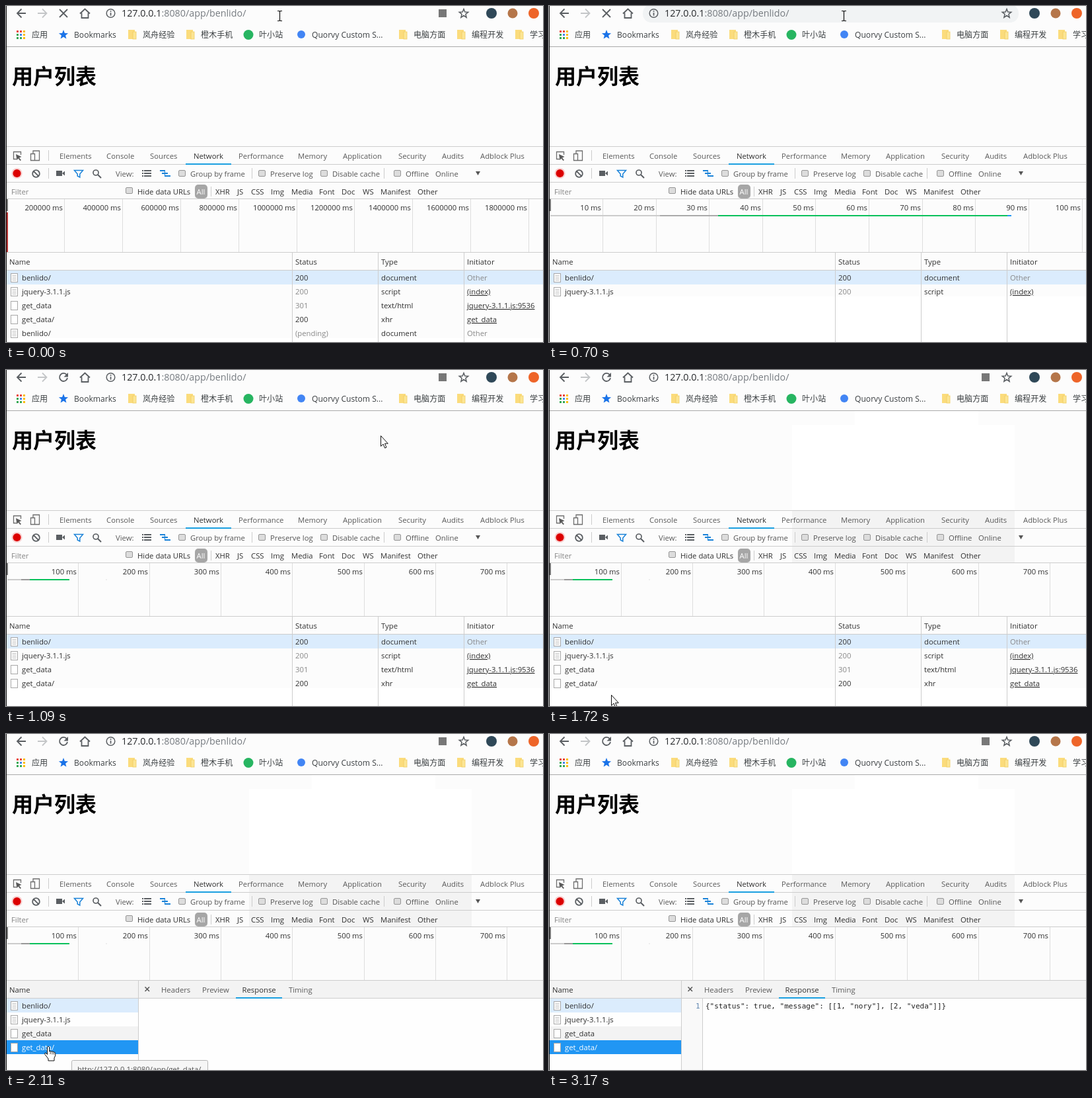
These frames come from a looping animation (813 by 508 pixels, 4230 ms). An HTML page:

```html
<!DOCTYPE html>
<html lang="zh">
<head>
<meta charset="utf-8">
<style>
html, body { margin: 0; width: 100%; height: 100%; overflow: hidden; background: #fcfcfc; }
svg { display: block; width: 813px; height: 508px; }
text { font: 11.3px "Open Sans", "Noto Sans CJK SC", sans-serif; white-space: pre; }
.mark { font-size: 12.1px; }
.url { font-size: 14.3px; }
.title { font: bold 32px "Noto Sans CJK SC", sans-serif; }
.code { font: 11px "DejaVu Sans Mono", monospace; }
.end { text-anchor: end; }
.link { text-decoration: underline; }
</style>
</head>
<body>
<svg id="stage" viewBox="0 0 813 508">
  <g id="under"></g><g id="chrome"></g><g id="live"></g>
</svg>
<script>
const LOOP = 4230, USER = 'benlido';
const INK = '#303030', DIM = '#888', ICON = '#5a5e62', RULE = '#cdcdcd', BLUE = '#1a9fe0';
const $ = id => document.getElementById(id);

const text = (x, y, s, fill = INK, cls = '') => `<text x="${x}" y="${y}" fill="${fill}" class="${cls}">${s}</text>`;
const rect = (x, y, w, h, fill, more = '') => `<rect x="${x}" y="${y}" width="${w}" height="${h}" fill="${fill}" ${more}/>`;
const disc = (x, y, r, fill, more = '') => `<circle cx="${x}" cy="${y}" r="${r}" fill="${fill}" ${more}/>`;
const line = (d, stroke = ICON, w = 1.8) => `<path d="${d}" fill="none" stroke="${stroke}" stroke-width="${w}"/>`;
const shape = (d, fill, more = '') => `<path d="${d}" fill="${fill}" ${more}/>`;
const hRule = (y, x = 1, w = 812, c = RULE) => rect(x, y, w, 1, c);
const vRule = (x, y, h, c = RULE) => rect(x, y, 1, h, c);
const labels = (y, fill, list) => list.map(([x, s]) => text(x, y, s, fill)).join('');

function star(cx, cy, r) {
  let d = '';
  for (let i = 0; i < 10; i++) {
    const a = Math.PI * (i / 5 - 0.5), q = i % 2 ? r * 0.43 : r;
    d += (i ? 'L' : 'M') + (cx + q * Math.cos(a)).toFixed(1) + ' ' + (cy + q * Math.sin(a)).toFixed(1);
  }
  return d + 'Z';
}

const folder = x => rect(x, 36, 10, 14, '#fbdc7c') + rect(x + 7, 39, 5, 11, '#fce593', 'stroke="#f0cc62" stroke-width=".8"');
const checkbox = (x, y) => rect(x + .5, y + .5, 10, 9, '#dcdcdc', 'rx="1.5" stroke="#969696"');

function browserBar() {
  const dots = ['#ea4335', '#ea4335', '#fbbc05', '#34a853', '#4285f4', '#fbbc05', '#34a853', '#34a853', '#fbbc05'];
  return line('M30 11H17.5M23.5 4.5L17 11L23.5 17.5') +
    line('M48 11H61M55 4.5L61.5 11L55 17.5', '#c4c6c8') +
    line('M112 11.5L119.5 4.5L127 11.5M114.5 10.5V18H124.5V10.5') +
    disc(158.5, 11, 6.3, 'none', `stroke="${ICON}" stroke-width="1.5"`) +
    rect(157.7, 10, 1.7, 4.6, ICON) + rect(157.7, 7, 1.7, 1.8, ICON) +
    text(175, 16, `127.0.0.1<tspan fill="#767b80">:8080/app/${USER}/</tspan>`, '#27292c', 'url') +
    line(star(693, 11.5, 7), ICON, 1.5) +
    disc(735, 11, 8, '#2f4858') + disc(767, 11, 7.5, '#b5764a') + disc(799, 11, 8, '#ee6529') +
    dots.map((c, i) => rect(16 + i % 3 * 5, 37 + (i / 3 | 0) * 5, 3, 3, c)).join('') +
    shape(star(87, 43.5, 7.5), '#1a73e8') +
    [185, 273, 595, 683, 771].map(folder).join('') +
    disc(367, 43.5, 7.5, '#27b561') + disc(447, 43, 6, '#4285f4') +
    [[39, '应用'], [103, 'Bookmarks'], [207, '岚舟经验'], [295, '橙木手机'], [383, '叶小站'],
     [463, 'Quorvy Custom S...'], [617, '电脑方面'], [705, '编程开发'], [793, '学习']]
      .map(([x, s]) => text(x, 48, s, '#3c4043', 'mark')).join('') +
    hRule(61, 1, 812, '#aaa') +
    text(9, 118, '用户列表', '#000', 'title');
}

function toolbars() {
  const bars = [249, 253, 257].map(y => rect(206, y - 1, 2, 2, ICON) + rect(209, y - 1, 11, 2, ICON)).join('');
  return [212, 239, 266, 291].map(y => hRule(y)).join('') +
    line('M16 231.5H11.5V220.5H22.5V225', '#6e6e6e', 1.3) + shape('M15 224L23.5 228L20 229.5L23 233L21.5 234L18.5 230.5L16.5 233Z', '#5a5a5a') +
    line('M41 223V219H50.5V233.5H44M37.5 223.5H43.5V233.5H37.5Z', '#6e6e6e', 1.3) +
    vRule(64, 218, 16) +
    labels(231, '#5a5a5a', [[81, 'Elements'], [152, 'Console'], [218, 'Sources'], [352, 'Performance'], [442, 'Memory'],
      [510, 'Application'], [594, 'Security'], [660, 'Audits'], [718, 'Adblock Plus']]) +
    text(284, 231, 'Network') + rect(272, 238, 69, 2, BLUE) +
    disc(16.5, 253, 8, '#f8cfcf') + disc(16.5, 253, 6, '#dc0000') +
    disc(45.5, 253.5, 5.3, 'none', `stroke="${ICON}" stroke-width="1.8"`) + line('M42 250L49 257') +
    vRule(64, 245, 16) + rect(76, 249, 9, 8, ICON) + shape('M85 253L89 249.5V256.5Z', ICON) +
    line('M103.5 248.5H116.5L111.8 254V259L108.2 257V254Z', '#1a82d8', 1.5) +
    disc(136, 252, 4, 'none', `stroke="${ICON}" stroke-width="1.7"`) + line('M139 255L144 260', ICON, 2) +
    text(166, 258, 'View:', '#5a5a5a') + bars +
    rect(233, 248, 8, 2, '#1a82d8') + rect(236, 252, 9, 2, '#1a82d8') + rect(241, 256, 8, 2, '#1a82d8') + rect(240, 248, 1, 10, '#1a82d8') +
    [261, 382, 476, 587].map(x => checkbox(x, 248)).join('') + checkbox(181, 274) +
    vRule(372, 245, 16) + vRule(572, 245, 16) +
    labels(258, '#555', [[279, 'Group by frame'], [400, 'Preserve log'], [494, 'Disable cache'], [605, 'Offline'], [650, 'Online']]) +
    shape('M711 250H718L714.5 256Z', '#555') +
    text(8, 285, 'Filter', '#858585') + rect(286, 270, 19, 21, '#a6a6a6', 'rx="5"') + text(288.5, 285, 'All', '#fff') + vRule(310, 273, 15) +
    labels(285, INK, [[199, 'Hide data URLs'], [317, 'XHR'], [350, 'JS'], [371, 'CSS'], [401, 'Img'], [432, 'Media'],
      [474, 'Font'], [508, 'Doc'], [540, 'WS'], [567, 'Manifest'], [623, 'Other']]) +
    hRule(372) + rect(0, 0, 1, 508, '#111');
}

// step: pixels per tick, unit: ms per tick, bars: [x, width, colour]
function timeline(step, unit, bars) {
  let s = '';
  for (let i = 1; 1 + i * step < 813; i++) {
    const x = Math.floor(0.7 + i * step);
    s += vRule(x, 292, 80, '#dedede') + text(x - 2, 309, i * unit + ' ms', INK, 'end');
  }
  return s + bars.map(([x, w, c]) => rect(x, 316, w, 2, c)).join('') + rect(1, 292, 2, 18, '#777');
}

const ROWS = [
  [USER + '/', '200', 'document', 'Other'],
  ['jquery-3.1.1.js', '200', 'script', '(index)'],
  ['get_data', '301', 'text/html', 'jquery-3.1.1.js:9536'],
  ['get_data/', '200', 'xhr', 'get_data'],
  [USER + '/', '(pending)', 'document', 'Other']
];

function fileCell(i, fill) {
  const y = 400 + 21 * i;
  let s = rect(7.5, y + 4.5, 10, 13, '#fff', 'stroke="#a8a8a8"');
  if (i < 2 || i > 3) for (let k = 0; k < 4; k++) s += rect(9.5, y + 7 + k * 2.4, 6, 1, '#c4c4c4');
  return s + text(24, y + 15, ROWS[i][0], fill);
}

function table(n, pending, hover) {
  const bottom = Math.min(508, 397 + 21 * n);
  let s = rect(1, bottom, 812, 508 - bottom, '#fff') + hRule(399);
  for (let i = 0; i < n; i++) {
    const y = 415 + 21 * i, [, status, type, from] = ROWS[i], link = from !== 'Other';
    const wait = pending && !i, dim = wait || ![0, 3].includes(i);
    if (!i) s += rect(1, 400, 812, 21, '#dbecfd');
    else if (i === hover) s += rect(1, 400 + 21 * i, 812, 21, '#f3f3f3');
    s += fileCell(i, INK) + text(438, y, wait ? '(pending)' : status, dim ? DIM : INK) +
      text(568, y, type) + text(698, y, from, link ? INK : DIM, link ? 'link' : '');
  }
  return s + labels(391, INK, [[5, 'Name'], [438, 'Status'], [568, 'Type'], [698, 'Initiator']]) +
    [433, 563, 693].map(x => vRule(x, 373, 135)).join('');
}

function details(loaded, tip) {
  const fills = ['#dbecfd', '#fefefe', '#f3f3f3', '#2196f3'];
  let s = rect(1, 373, 812, 135, '#fefefe') + rect(1, 373, 812, 26, '#f3f3f3') + hRule(399) + text(5, 391, 'Name');
  fills.forEach((c, i) => s += rect(1, 400 + 21 * i, 199, 21, c) + fileCell(i, i === 3 ? '#fff' : INK));
  s += vRule(200, 373, 135) + line('M210.5 382.5L217 389M217 382.5L210.5 389', '#555', 1.5) +
    labels(391, '#5a5a5a', [[235, 'Headers'], [297, 'Preview'], [428, 'Timing']]) +
    text(357.5, 391, 'Response') + rect(348, 398, 70, 2, BLUE);
  if (loaded) s += rect(201, 400, 31, 108, '#f9f9f9') + vRule(232, 400, 108) + text(222, 415, '1', '#5f86b0', 'code') +
    text(237, 415, '{"status": true, "message": [[1, "nory"], [2, "veda"]]}', '#222', 'code');
  if (tip) s += rect(99.5, 493.5, 206, 30, '#f6f6f6', 'rx="2" stroke="#b5b5b5"') + text(108, 511, 'http://127.0.0.1:8080/app/get_data/', '#555');
  return s;
}

const CURSORS = {
  beam: line('M-3.5 -7.5H-1L0 -6.5L1 -7.5H3.5M0 -7V7M-3.5 7.5H-1L0 6.5L1 7.5H3.5', '#111', 1.2),
  arrow: shape('M.5 .5V16.3L4 13L6.6 19L9 18L6.5 12.2H11.3Z', '#fff', 'stroke="#111"'),
  hand: shape('M-1.5 1.5Q0 -1 1.7 1.5V8L3.5 7.2L5 8.3L7 7.8L8 9.2L9.8 9Q11 9.5 10.8 14L9 18V22H0V19L-5 12.5Q-6 10 -4 10L-1.5 12.5Z',
    '#fff', 'stroke="#111" stroke-linejoin="round"') + line('M3.2 8V12M6 9V12.5M8.5 10V12.5', '#111', .8)
};

// [start ms, cursor, x, y]
const MOVES = [
  [0, 'beam', 414.5, 15], [150, 'beam', 428.5, 15], [270, 'beam', 446.5, 15], [940, 'arrow', 500, 44],
  [1090, 'arrow', 567, 99], [1210, 'arrow', 463, 190], [1360, 'arrow', 368, 270], [1480, 'arrow', 250, 370],
  [1600, 'arrow', 130, 463], [1720, 'arrow', 94, 491], [1840, 'hand', 64, 472], [2230, 'hand', 89, 463],
  [2380, 'arrow', 317, 398], [2500, 'arrow', 345, 400], [2620, 'arrow', 369, 397], [2770, 'arrow', 374, 395],
  [3050, 'arrow', 544, 450], [3170, '', 0, 0]
];

function under(t) {
  let s = '';
  if (t >= 270 && t < 1090) s += rect(142, -2, 569, 27, '#f1f3f4', 'rx="13"');
  if (t >= 1210) s += rect(463, 62, 187, 21, '#fff');
  if (t >= 1360) s += rect(368, 83, 337, 129, '#fff') + rect(368, 213, 337, 78, '#f3f3f3');
  return s;
}

function live(t) {
  const busy = t < 940, after = t >= 1090;
  let s = busy ? line('M81 5L93 17M93 5L81 17') :
    line('M92 7.5A6 6 0 1 0 93 12') + shape('M94 4V10.5H87.5Z', ICON);
  if (t < 150 || after) s += rect(655, 5, 12, 12, '#777');
  if (t < 150) s += timeline(87.87, 200000, []) + rect(1, 312, 2, 60, '#b83030');
  else if (after) s += timeline(108.3, 100, [[2, 21, '#ccc'], [23, 13, '#999'], [36, 60, '#0bc15c'], [151, 2, '#eee']]);
  else s += timeline(80.66, 10, t < 270 ? [] :
    [[2, 166, '#ccc'], [168, 88, '#aaa'], [256, 438, '#0bc15c'], ...(t < 700 ? [] : [[694, 6, '#2196f3']])]);
  if (t >= 1990) s += details(t >= 2230, t >= 2110 && t < 2230);
  else {
    const n = t < 150 ? 5 : t < 700 ? 1 : t < 820 ? 2 : t < 940 ? 3 : 4;
    const hover = t >= 1600 && t < 1720 || t >= 1840 ? 3 : -1;
    s += table(n, t >= 150 && t < 270, hover);
  }
  const [, kind, x, y] = MOVES.filter(m => m[0] <= t).pop();
  return kind ? s + `<g transform="translate(${x} ${y})">${CURSORS[kind]}</g>` : s;
}

const shown = {};
function paint(id, html) {
  if (shown[id] !== html) $(id).innerHTML = shown[id] = html;
}

function draw(t) {
  paint('under', under(t));
  paint('live', live(t));
}

paint('chrome', browserBar() + toolbars());
draw(0);
let start;
requestAnimationFrame(function tick(now) {
  start ??= now;
  draw((now - start) % LOOP);
  requestAnimationFrame(tick);
});
</script>
</body>
</html>
```
